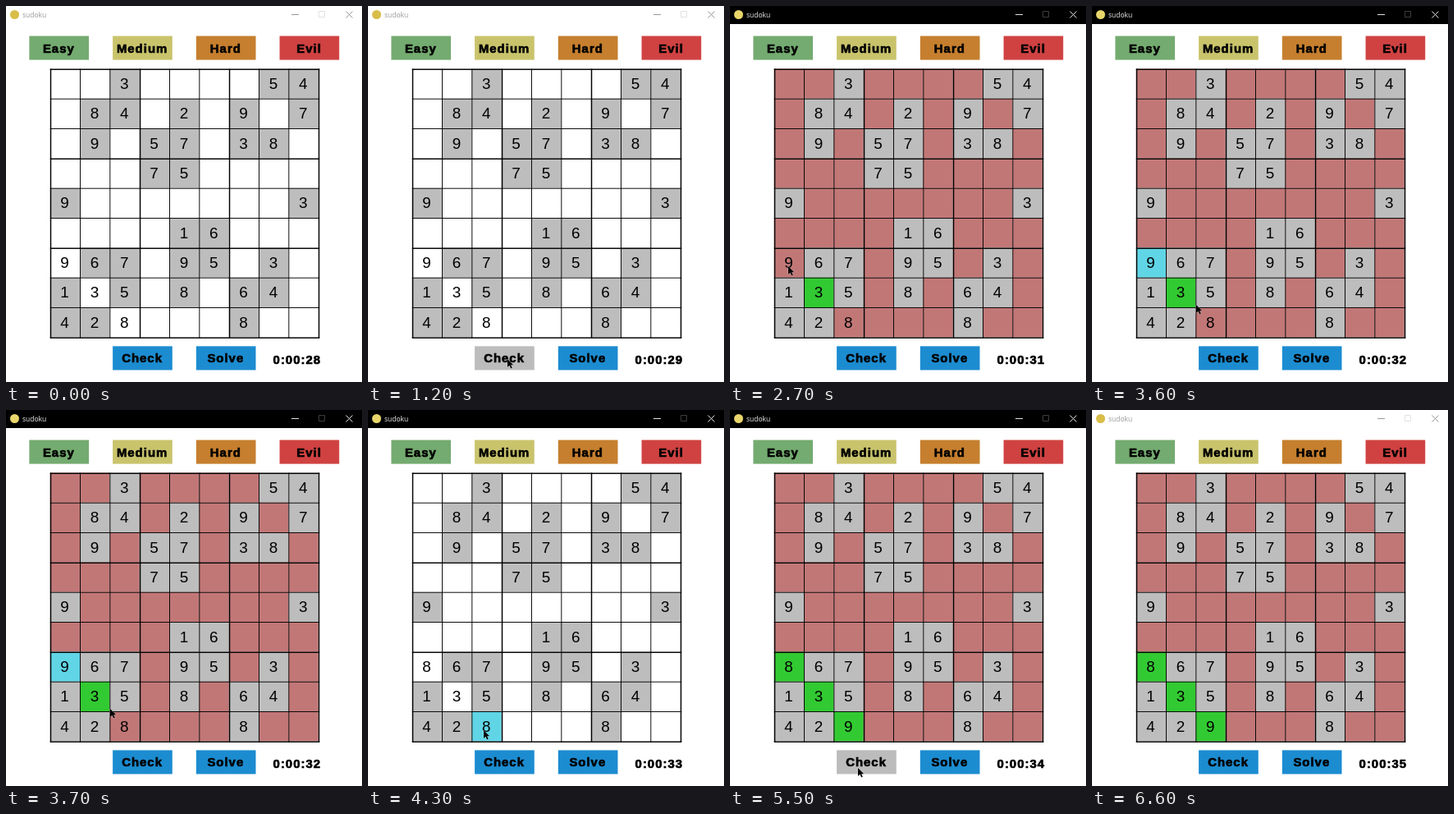
These frames come from a looping animation (434x458 px, 6700 ms). An HTML page with a canvas:

```html
<!DOCTYPE html>
<html lang="en">
<head>
<meta charset="utf-8">
<title>sudoku</title>
<style>
  html, body { margin: 0; width: 100%; height: 100%; overflow: hidden; background: #fff; }
  canvas { display: block; }
</style>
</head>
<body>
<canvas id="stage" width="434" height="458"></canvas>
<script>
const ctx = document.getElementById('stage').getContext('2d');
const LOOP = 6700, STEP = 100;

// The game is laid out on a 600 x 600 board, scaled to fit below the title bar
const SCALE = 436 / 600, SHIFT_X = -0.7, SHIFT_Y = 22;
const ORIGIN = 75, CELL = 50, BUTTON_W = 100, BUTTON_H = 40;

const puzzle = [
  '..3....54', '.84.2.9.7', '.9.57.38.',
  '...75....', '9.......3', '....16...',
  '.67.95.3.', '1.5.8.64.', '42....8..'
];
const solved = { '6,0': '8', '7,1': '3', '8,2': '9' };

const buttons = [
  ['Easy', 40, 20, '#74ab70'], ['Medium', 180, 20, '#c9c46c'],
  ['Hard', 320, 20, '#c67f2e'], ['Evil', 460, 20, '#d04242'],
  ['Check', 180, 540, '#1c8cd1'], ['Solve', 320, 540, '#1c8cd1']
];

// Pointer path on the stage: time, x, y
const path = [
  [400, 418, 396], [600, 330, 410], [700, 280, 428], [900, 190, 433],
  [1000, 170, 430], [1300, 170, 430], [1700, 166, 429], [2000, 166, 429],
  [2200, 140, 400], [2600, 70, 317], [2800, 72, 317], [3000, 120, 355],
  [3200, 122, 357], [3500, 127, 364], [3800, 127, 364], [4000, 141, 390],
  [4900, 141, 390], [5200, 156, 436], [5500, 156, 436], [5600, 200, 446],
  [5900, 432, 456]
];

function pointerAt(t) {
  const next = path.findIndex(p => p[0] > t);
  if (next < 1) return null;
  const [t0, x0, y0] = path[next - 1], [t1, x1, y1] = path[next];
  const k = (t - t0) / (t1 - t0);
  return { x: Math.round(x0 + (x1 - x0) * k), y: Math.round(y0 + (y1 - y0) * k) };
}

function stateAt(t) {
  return {
    active: t >= 1300 && t < 6500,
    checked: (t >= 1600 && t < 3800) || t >= 5400,
    selected: t >= 2800 && t < 4000 ? '6,0' : t >= 4000 && t < 5400 ? '8,2' : '',
    entries: { '6,0': t < 3800 ? '9' : '8', '7,1': '3', '8,2': t < 4900 ? '8' : '9' },
    seconds: 28 + Math.floor((t + 700) / 1000),
    pointer: pointerAt(t)
  };
}

function rect(x, y, w, h, color) {
  ctx.fillStyle = color;
  ctx.fillRect(x, y, w, h);
}

function text(str, x, y, font, align = 'center', color = '#000') {
  ctx.font = font;
  ctx.textAlign = align;
  ctx.fillStyle = color;
  ctx.fillText(str, x, y);
}

function boldText(str, x, y, align) {
  ctx.letterSpacing = '1.4px';
  text(str, x, y, 'bold 20.5px "Liberation Sans", sans-serif', align);
  ctx.lineWidth = 0.9;
  ctx.strokeStyle = '#000';
  ctx.strokeText(str, x, y);
  ctx.letterSpacing = '0px';
}

function strokePath(d, color) {
  ctx.lineWidth = 1;
  ctx.strokeStyle = color;
  ctx.stroke(new Path2D(d));
}

function drawTitleBar(active) {
  if (active) rect(0, 0, 434, 22, '#000');
  ctx.fillStyle = active ? '#e9d66b' : '#d8bd48';
  ctx.beginPath();
  ctx.arc(10.5, 10.5, 5.5, 0, 7);
  ctx.fill();
  text('sudoku', 20, 14, '8.5px "Open Sans", sans-serif', 'left', active ? '#eee' : '#999');
  const color = active ? '#e0e0e0' : '#999';
  strokePath('M348 10.5h9', color);
  strokePath('M381.5 6.5h7v7h-7z', active ? '#3c3c3c' : '#e2e2e2');
  strokePath('M414.5 6.5l8 8m0 -8l-8 8', color);
}

function drawButtons(pointer) {
  const px = pointer ? (pointer.x - SHIFT_X) / SCALE : -1;
  const py = pointer ? (pointer.y - SHIFT_Y) / SCALE : -1;
  for (const [label, x, y, color] of buttons) {
    const over = px >= x && px < x + BUTTON_W && py >= y && py < y + BUTTON_H;
    rect(x, y, BUTTON_W, BUTTON_H, over ? '#bcbcbc' : color);
    boldText(label, x + 49.5, y + 27.5, 'center');
  }
}

function cellColor(key, given, s) {
  if (given) return '#bdbdbd';
  if (key === s.selected) return '#60d5e6';
  if (!s.checked) return '#fff';
  return solved[key] && solved[key] === s.entries[key] ? '#32ca32' : '#c27777';
}

function drawBoard(s) {
  puzzle.forEach((row, r) => [...row].forEach((char, c) => {
    const key = r + ',' + c, given = char !== '.';
    const x = ORIGIN + c * CELL, y = ORIGIN + r * CELL;
    rect(x, y, CELL, CELL, cellColor(key, given, s));
    const digit = given ? char : s.entries[key];
    if (digit) text(digit, x + 24.5, y + 33.7, '26px "Liberation Sans", sans-serif');
  }));
  const size = 9 * CELL;
  for (let i = 0; i <= 9; i++) {
    const thick = i % 3 ? 1.3 : 2;
    const at = ORIGIN + i * CELL + (i % 3 ? -0.15 : 0);
    rect(at, ORIGIN, thick, size + 2, '#000');
    rect(ORIGIN, at, size + 2, thick, '#000');
  }
}

function drawPointer({ x, y }) {
  const arrow = new Path2D('M0 0V10L2.4 7.8L4.2 11.6L5.8 10.8L4.1 7.2H7.2Z');
  ctx.translate(x, y);
  ctx.lineWidth = 1;
  ctx.strokeStyle = 'rgba(255, 255, 255, 0.4)';
  ctx.stroke(arrow);
  ctx.fillStyle = '#000';
  ctx.fill(arrow);
}

function draw(t) {
  const s = stateAt(t);
  ctx.resetTransform();
  rect(0, 0, 434, 458, '#fff');
  drawTitleBar(s.active);
  ctx.setTransform(SCALE, 0, 0, SCALE, SHIFT_X, SHIFT_Y);
  drawButtons(s.pointer);
  drawBoard(s);
  boldText('0:00:' + s.seconds, 449, 569.5, 'left');
  ctx.resetTransform();
  if (s.pointer) drawPointer(s.pointer);
}

function frame() {
  const t = performance.now() % LOOP;
  draw(Math.floor(t / STEP) * STEP);
  requestAnimationFrame(frame);
}
frame();
</script>
</body>
</html>
```
